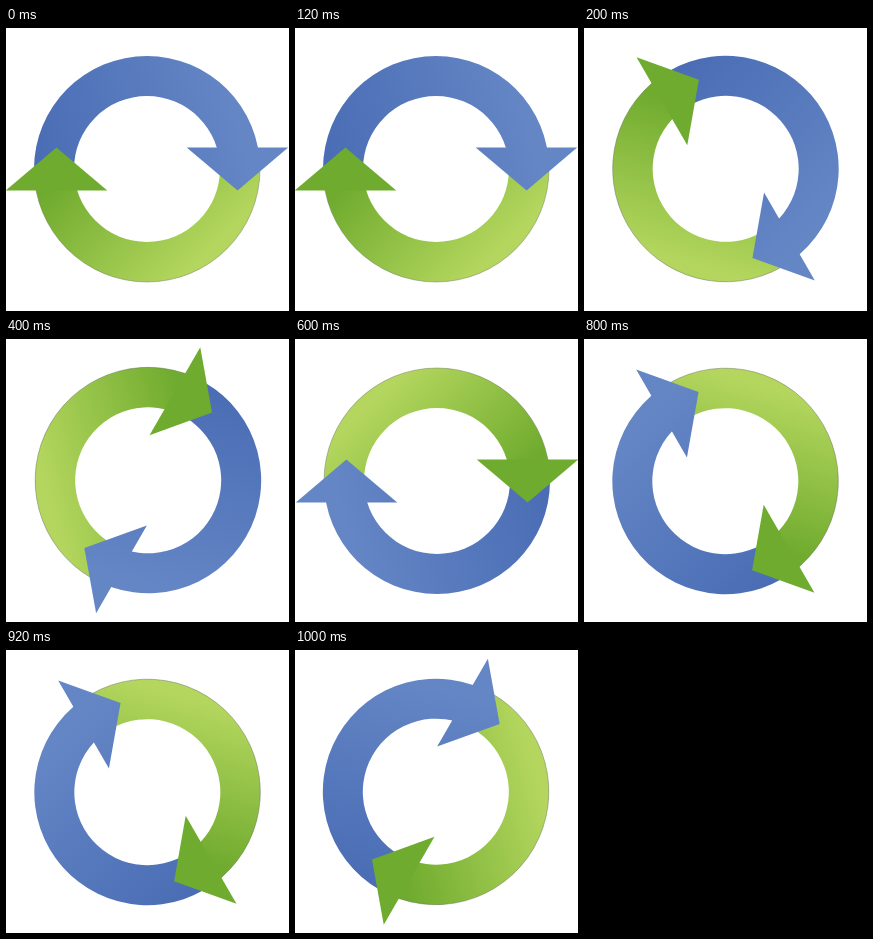
Recreate the animation shown at these times as an HTML page. Size 283 by 283 pixels, loop 1.2 s.

```html
<!DOCTYPE html>
<html lang="en">
<head>
<meta charset="utf-8">
<title>Cycle arrows</title>
<style>
  html, body { margin: 0; width: 100%; height: 100%; overflow: hidden; background: #fff; }
  svg { display: block; width: 100vw; height: 100vh; }
</style>
</head>
<body>
<svg viewBox="0 0 283 283">
  <defs>
    <linearGradient id="blue" gradientUnits="userSpaceOnUse" x1="-97" y1="26" x2="97" y2="-26">
      <stop offset="0" stop-color="#4a6db5"/>
      <stop offset="1" stop-color="#6486c5"/>
    </linearGradient>
    <linearGradient id="green" gradientUnits="userSpaceOnUse" x1="-38" y1="-38" x2="72" y2="72">
      <stop offset="0" stop-color="#6fab2e"/>
      <stop offset="1" stop-color="#b4d65e"/>
    </linearGradient>
  </defs>
  <g id="wheel">
    <path id="greenArc" fill="url(#green)"/>
    <path id="rim" fill="none" stroke="#66745a" stroke-width="0.8" stroke-opacity="0.55"/>
    <path id="blueArc" fill="url(#blue)"/>
    <path id="greenHead" fill="#6fab2e"/>
    <path id="blueHead" fill="url(#blue)"/>
  </g>
</svg>
<script>
  const OUTER = 113, INNER = 73;
  const LOOP = 1200, STEPS = 6;
  const wheel = document.getElementById('wheel');

  const setPath = (id, d) => document.getElementById(id).setAttribute('d', d);

  // side is 1 for the upper half, -1 for the lower half
  const arc = (r, side) => `M${-r * side} 0A${r} ${r} 0 0 1 ${r * side} 0`;
  const halfRing = side =>
    `${arc(OUTER, side)}L${INNER * side} 0A${INNER} ${INNER} 0 0 0 ${-INNER * side} 0Z`;
  const head = side =>
    `M${39.7 * side} ${-21.4 * side}L${141.2 * side} ${-21.4 * side}L${90.6 * side} ${21.4 * side}Z`;

  setPath('blueArc', halfRing(1));
  setPath('greenArc', halfRing(-1));
  setPath('rim', arc(OUTER, -1));
  setPath('blueHead', head(1));
  setPath('greenHead', head(-1));

  // The wheel holds each pose, then jumps a sixth of a turn about a slightly offset hub.
  function draw(time) {
    const step = Math.floor((time % LOOP) / (LOOP / STEPS));
    const angle = step * 360 / STEPS;
    wheel.setAttribute('transform',
      `translate(141.5 141.5) rotate(${angle}) translate(-0.5 -0.5)`);
  }

  const start = performance.now();
  function tick() {
    draw(performance.now() - start);
    requestAnimationFrame(tick);
  }
  tick();
</script>
</body>
</html>
```
